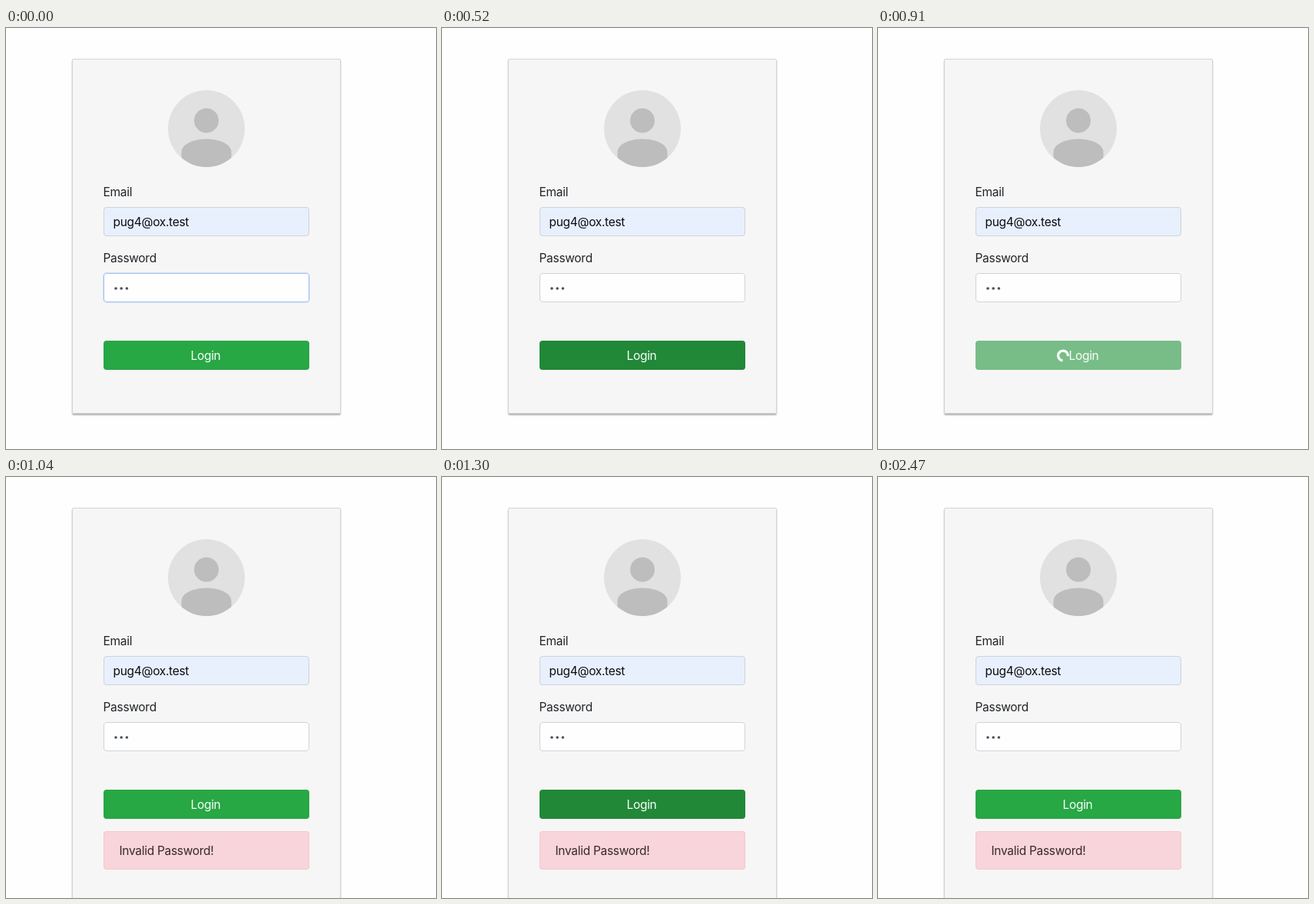
Write an HTML page with a canvas that moves like this. It is 560x548 px and loops after 2.86 s.

```html
<!DOCTYPE html>
<html lang="en">
<head>
<meta charset="utf-8">
<title>Login form</title>
<style>
  html, body { margin: 0; width: 100%; height: 100%; overflow: hidden; background: #fefefe; }
  canvas { display: block; }
</style>
</head>
<body>
<canvas id="stage" width="560" height="548"></canvas>
<script>
const ctx = document.getElementById('stage').getContext('2d');
const LOOP = 2860;
const GREEN = '#28a745', DARK = '#218838';

// Each step holds until the next one begins.
const steps = [
  { at: 0, button: GREEN, focus: true },
  { at: 130, button: DARK },
  { at: 390, button: '#1e7e34', ring: true },
  { at: 520, button: DARK },
  { at: 780, button: '#72b683', spin: -12 },
  { at: 910, button: '#78bd87', spin: 50 },
  { at: 1040, button: GREEN, alert: true },
  { at: 1170, button: '#259840', alert: true },
  { at: 1300, button: DARK, alert: true },
  { at: 2340, button: '#24a042', alert: true },
  { at: 2470, button: GREEN, alert: true }
];

function box(x, y, w, h, r, fill, border) {
  ctx.beginPath();
  ctx.roundRect(x, y, w, h, r);
  ctx.fillStyle = fill;
  ctx.fill();
  if (!border) return;
  ctx.beginPath();
  ctx.roundRect(x + 0.5, y + 0.5, w - 1, h - 1, r - 0.5);
  ctx.strokeStyle = border;
  ctx.lineWidth = 1;
  ctx.stroke();
}

function text(str, x, y, color) {
  ctx.font = '15.5px Inter, "Open Sans", sans-serif';
  ctx.letterSpacing = '-0.3px';
  ctx.fillStyle = color;
  ctx.fillText(str, x, y);
}

function disc(x, y, r, color) {
  ctx.beginPath();
  ctx.arc(x, y, r, 0, Math.PI * 2);
  ctx.fillStyle = color;
  ctx.fill();
}

function drawCard(height) {
  ctx.save();
  ctx.shadowColor = 'rgba(0,0,0,0.3)';
  ctx.shadowBlur = 2;
  ctx.shadowOffsetY = 2;
  box(86, 40, 350, height, 2, '#f6f6f6');
  ctx.restore();
  box(86, 40, 350, height, 2, '#f6f6f6', '#d4d4d4');
}

function drawAvatar() {
  ctx.save();
  disc(261, 131, 50, '#e1e1e1');
  ctx.clip();
  disc(261, 120.5, 16, '#bdbdbd');
  ctx.beginPath();
  ctx.moveTo(228.5, 182);
  ctx.lineTo(228.5, 162);
  ctx.bezierCurveTo(228.5, 150, 246, 144.5, 261, 144.5);
  ctx.bezierCurveTo(276, 144.5, 293.5, 150, 293.5, 162);
  ctx.lineTo(293.5, 182);
  ctx.fill();
  ctx.restore();
}

function drawFields(focus) {
  text('Email', 126.5, 219, '#212529');
  box(127, 233, 268, 38, 4, '#e8f0fe', '#ced4da');
  text('pug4@ox.test', 139.5, 258, '#0b0c0e');

  text('Password', 126.5, 305, '#212529');
  if (focus) box(126, 318, 270, 40, 5, 'rgba(0,123,255,0.15)');
  box(127, 319, 268, 38, 4, '#fefefe', focus ? '#a8c2ee' : '#ced4da');
  for (let i = 0; i < 3; i++) disc(143 + i * 7.2, 339, 1.8, '#495057');
}

function drawButton({ button, ring, spin }) {
  if (ring) box(125, 405, 272, 42, 6, 'rgba(72,180,97,0.3)');
  box(127, 407, 268, 38, 4, button);
  const busy = spin !== undefined;
  text('Login', busy ? 248.5 : 240.5, 432, '#fdfdfd');
  if (!busy) return;
  const start = (45 + spin) * Math.PI / 180;
  ctx.beginPath();
  ctx.arc(241, 426.5, 6.4, start, start + Math.PI * 1.5);
  ctx.strokeStyle = '#fdfdfd';
  ctx.lineWidth = 3.2;
  ctx.stroke();
}

function drawAlert() {
  box(127, 461, 268, 50, 4, '#f8d5da', '#f5c6cb');
  text('Invalid Password!', 147.5, 492, '#38282c');
}

function draw(t) {
  const step = steps.findLast(s => s.at <= t);
  ctx.fillStyle = '#fefefe';
  ctx.fillRect(0, 0, 560, 548);
  drawCard(step.alert ? 528 : 462);
  drawAvatar();
  drawFields(step.focus);
  drawButton(step);
  if (step.alert) drawAlert();
}

const origin = performance.now();
function tick() {
  draw((performance.now() - origin) % LOOP);
  requestAnimationFrame(tick);
}
tick();
</script>
</body>
</html>
```
